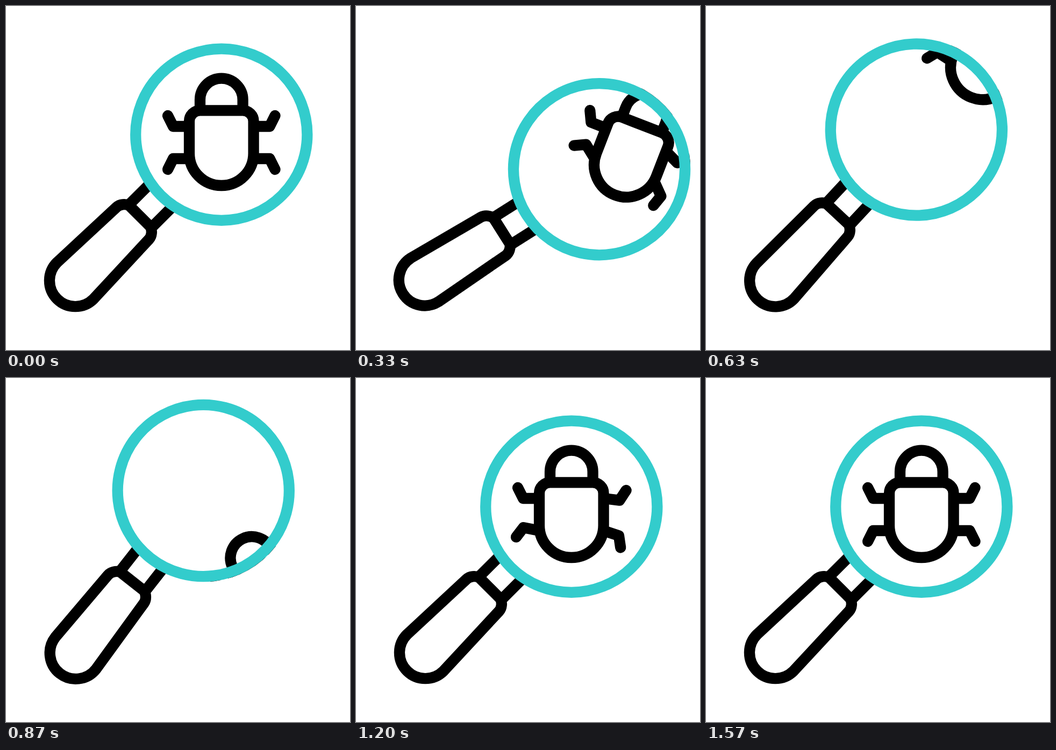
Animation, 640 px wide and 640 px high, one loop 1670 ms. Source, as an HTML page:

```html
<!DOCTYPE html>
<html lang="en">
<head>
<meta charset="utf-8">
<title>Bug search</title>
<style>
  html, body { margin: 0; width: 100%; height: 100%; overflow: hidden; background: #fff; }
  svg { display: block; width: 100%; height: 100%; }
</style>
</head>
<body>
<svg viewBox="0 0 640 640" fill="none" stroke="#000" stroke-width="20.3">
  <clipPath id="lens"><circle cx="400.8" cy="239.2" r="169.9"/></clipPath>
  <g id="glass">
    <path d="M228 370.5 268 330.5M272 411 312 371"/>
    <path d="M206 374 95 477A48 48 0 0 0 163 545L266 434C271.5 428 272 418 269 411L229 371C222 368 212 368.5 206 374Z"/>
    <circle cx="400.8" cy="239.2" r="159.6" fill="#fff" stroke="none"/>
    <g clip-path="url(#lens)">
      <g id="bug">
        <g id="legs" stroke-linejoin="round" stroke-linecap="round">
          <path d="M341 224H311L301 204"/>
          <path d="M460.5 224H490.5L500.5 204"/>
          <path d="M341 284H311L301 304"/>
          <path d="M460.5 284H490.5L500.5 304"/>
        </g>
        <path d="M361 194V174.5A39.8 39.8 0 0 1 440.6 174.5V194"/>
        <path fill="#fff" d="M361 194.4H440.6A20 20 0 0 1 460.6 214.4V274.2A59.8 59.8 0 0 1 341 274.2V214.4A20 20 0 0 1 361 194.4Z"/>
      </g>
    </g>
    <circle cx="400.8" cy="239.2" r="159.6" stroke="#3cc"/>
  </g>
</svg>
<script>
const LOOP = 1670, FPS = 30;
const glass = document.getElementById('glass');
const bug = document.getElementById('bug');
const legs = [...document.getElementById('legs').children];

// Steps: start of the first swings, how many, half period, size, start of the last swing
const gaits = [
  { x: 341,   y: 224, start: 0,   count: 3, half: 5,    size: 42,   last: 37 },
  { x: 460.5, y: 224, start: 1.5, count: 2, half: 6,    size: 39,   last: 34.4 },
  { x: 341,   y: 284, start: 2.4, count: 2, half: 7,    size: 38,   last: 33.5 },
  { x: 460.5, y: 284, start: 5,   count: 2, half: 5,    size: 44.5, last: 33.8 }
];

function ease(t, from, to) {
  const p = Math.min(1, Math.max(0, (t - from) / (to - from)));
  return p * p * (3 - 2 * p);
}

function glassAngle(t) {
  return 13.65 * ease(t, 0, 12) - 22.38 * ease(t, 12, 23) + 8.73 * ease(t, 23, 33);
}

function legAngle(t, { start, count, half, size, last }) {
  let local = t - (t < last ? start : last);
  const span = 2 * half * (t < last ? count : 1);
  if (local < 0 || local > span || t >= 47) return 0;
  local %= 2 * half;
  return size * (ease(local, 0, half) - ease(local, half, 2 * half));
}

function bugPose(t) {
  if (t < 24) {
    const out = ease(t, 0, 30);
    return [206 * out, -206 * out, 33 * out];
  }
  const left = 1 - ease(t, 23, 33);
  return [119.5 * left, 251 * left, -24 * left];
}

function draw(now) {
  const t = Math.floor((now % LOOP) * FPS / 1000 + 0.101);
  const [x, y, turn] = bugPose(t);
  glass.setAttribute('transform', `rotate(${glassAngle(t)} 135.5 505)`);
  bug.setAttribute('transform', `translate(${x} ${y}) rotate(${turn} 400.8 234)`);
  legs.forEach((leg, i) => {
    const gait = gaits[i];
    leg.setAttribute('transform', `rotate(${legAngle(t, gait)} ${gait.x} ${gait.y})`);
  });
}

const begin = performance.now();
function tick() {
  draw(performance.now() - begin);
  requestAnimationFrame(tick);
}
tick();
</script>
</body>
</html>
```
